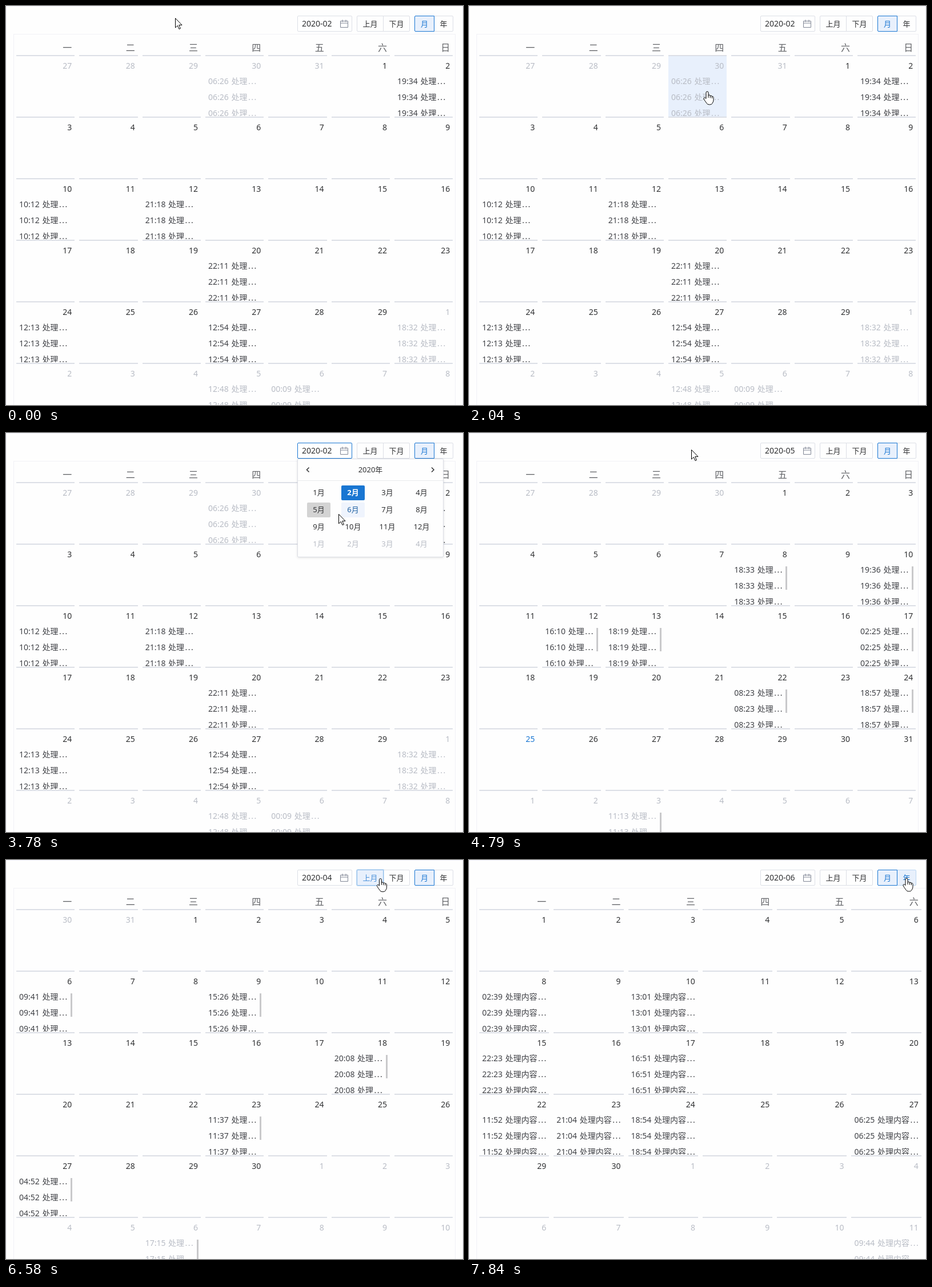
An HTML page that plays this animation: 800x700 px, repeating every 8 s.

```html
<!DOCTYPE html>
<html lang="zh-CN">
<head>
<meta charset="utf-8">
<title>日历</title>
<style>
html, body { margin: 0; width: 100%; height: 100%; overflow: hidden; background: #fff; }
body { font: 14px/28px "Noto Sans", "Noto Sans CJK SC", "Noto Sans CJK", sans-serif; color: #303133; }
#stage { --blue: #1976d2; --line: #dcdfe6; position: relative; width: 800px; height: 700px; overflow: hidden; background: #fefefe; }
#stage, #stage * { box-sizing: border-box; }
#stage > * { position: absolute; }
#edge { inset: 0; border: 1px solid #f4f4fc; border-bottom: 0; }
#card { left: 13px; top: 49px; width: 774px; height: 700px; border: 1px solid #f1f1f6; }
.wide #card { width: 900px; }

.hot {
  --h: 0;
  background: color-mix(in srgb, #e8f0fc calc(var(--h) * 100%), #fefefe);
  color: color-mix(in srgb, var(--blue) calc(var(--h) * 100%), #303133);
}
.box { top: 17px; height: 28px; line-height: 26px; font-size: 13px; text-align: center; border: 1px solid var(--line); }
.box.hot { border-color: color-mix(in srgb, #bad6f2 calc(var(--h) * 100%), var(--line)); }
.box.focus { border-color: #8fbdea; box-shadow: 0 0 0 1px #c9dff5; color: #4a91da; z-index: 1; }
#input { left: 510px; width: 96px; padding-left: 7px; font-size: 14px; text-align: left; border-radius: 2px; background: #fff; }
#input.on { border-color: var(--blue); }
#input svg { position: absolute; left: 74px; top: 6px; }
#prev { left: 614px; width: 47px; border-radius: 2px 0 0 2px; }
#next { left: 660px; width: 47px; border-radius: 0 2px 2px 0; }
#month { left: 715px; width: 35px; border-radius: 2px 0 0 2px; z-index: 1; background: #e8f0fc; color: var(--blue); border-color: var(--blue); }
#year { left: 749px; width: 34px; border-radius: 0 2px 2px 0; }

.grid { left: 18px; display: grid; grid-template-columns: repeat(7, var(--w)); column-gap: 8px; }
#week { top: 59px; text-align: right; font-size: 16px; color: #606266; }
#week span { padding-right: 5px; }
#days { top: 86px; grid-auto-rows: 108px; }
.day { position: relative; border-top: 2px solid var(--line); color: #303133; }
.day b { position: absolute; right: 5px; top: 3px; font-weight: 400; }
.day ul { position: absolute; left: 5px; top: 30px; height: 75px; margin: 0; padding: 0; overflow: hidden; list-style: none; white-space: nowrap; word-spacing: 1px; color: #404247; }
.day i { font-style: normal; letter-spacing: 1.5px; padding-left: 1.5px; }
.day s { position: absolute; left: calc(var(--w) - 7.3px); top: 38px; width: 3px; height: 41px; background: #c9c9cb; opacity: var(--bar); }
.muted b, .muted ul { color: #b8bcc5; font-weight: 500; }
.today b { color: var(--blue); }

#popup { left: 510px; top: 45px; width: 256px; height: 173px; background: #fefefe; border: 1px solid var(--line); border-radius: 2px; box-shadow: 0 1px 4px #0000001f; transform-origin: top; z-index: 2; font-size: 13px; text-align: center; }
#popup > * { position: absolute; }
#title { left: 0; right: 0; top: 0; height: 38px; line-height: 36px; border-bottom: 1px solid #e8eaec; }
#popup .m { width: 41px; height: 26px; line-height: 25px; border-radius: 2px; }
#popup .sel { background: var(--blue); color: #fff; font-weight: 700; }
#popup .now { background: #d3d3d3; color: #303133; }
#popup .off { color: #b8bcc5; }
svg { display: block; fill: none; overflow: visible; }
#cursor { left: 0; top: 0; z-index: 3; fill: #fff; stroke: #000; stroke-linejoin: round; }
</style>
</head>
<body>
<div id="stage">
  <div id="edge"></div>
  <div id="card"></div>
  <div id="input" class="box"><span id="value"></span>
    <svg width="14" height="14" stroke="#808695"><path d="M.5 2.5h13v11H.5zM.5 6h13M4 0v4M10 0v4"/></svg>
  </div>
  <div id="prev" class="box hot">上月</div>
  <div id="next" class="box hot">下月</div>
  <div id="month" class="box">月</div>
  <div id="year" class="box hot">年</div>
  <div id="week" class="grid"></div>
  <div id="days" class="grid"></div>
  <div id="popup">
    <div id="title">2020年</div>
    <svg style="left:15px;top:14px" width="6" height="9" stroke="#303133" stroke-width="1.5"><path d="M4.5 .5l-4 4 4 4"/></svg>
    <svg style="left:233px;top:14px" width="6" height="9" stroke="#303133" stroke-width="1.5"><path d="M1 .5l4 4-4 4"/></svg>
  </div>
  <svg id="cursor" width="1" height="1">
    <path id="arrow" d="M.5 .5V17L4.3 13.4 7 19.5 9.4 18.5 6.8 12.4H12Z"/>
    <g id="hand">
      <path d="M-2 12V2Q-2 0 0 0 2 0 2 2V7.5Q2 6 3.7 6.3 5.3 6.6 5.3 8 5.6 7 7 7.3 8.4 7.6 8.4 9 8.8 8.3 9.8 8.6 11 9 11 10.5V15Q11 18 9 20.5 8.5 23 3.5 23 0 23-1 20.5-4 16.5-6 13-6.4 11-4.8 10.7-3.5 10.5-2 12.5Z"/>
      <path fill="none" d="M2 7.5V11M5.3 8V11.5M8.4 9V12"/>
    </g>
  </svg>
</div>
<script>
const LOOP = 8000;
const DAY = 864e5;
const $ = id => document.getElementById(id);
const clamp = v => Math.max(0, Math.min(1, v));

// events: cell index -> time of day
const views = [
  { at: -LOOP, month: 2, first: '2020-01-27', events: { 3: '06:26', 6: '19:34', 14: '10:12', 16: '21:18', 24: '22:11', 28: '12:13', 31: '12:54', 34: '18:32', 38: '12:48', 39: '00:09' } },
  { at: 4440, month: 5, first: '2020-04-27', events: { 11: '18:33', 13: '19:36', 15: '16:10', 16: '18:19', 20: '02:25', 25: '08:23', 27: '18:57', 37: '11:13' } },
  { at: 6290, month: 4, first: '2020-03-30', events: { 7: '09:41', 10: '15:26', 19: '20:08', 24: '11:37', 28: '04:52', 37: '17:15' } },
  { at: 6900, month: 5, first: '2020-04-27', events: { 0: '23:34', 4: '13:23', 16: '14:43', 20: '19:20', 22: '17:35', 24: '03:47', 29: '07:47', 31: '16:07', 39: '03:49' } },
  { at: 7160, month: 6, first: '2020-06-01', wide: true, events: { 7: '02:39', 9: '13:01', 14: '22:23', 16: '16:51', 21: '11:52', 22: '21:04', 23: '18:54', 26: '06:25', 40: '09:44' } }
];

// pointer path: time, x, y
const path = [
  [0, 296, 21], [70, 296, 21], [780, 415, 155], [1960, 415, 155], [2040, 417, 150],
  [2560, 572, 30], [2710, 572, 30], [3480, 605, 138], [3700, 605, 138], [3780, 582, 142],
  [4100, 548, 138], [4440, 546, 138], [4790, 389, 29], [4960, 391, 190], [5190, 391, 190],
  [5970, 682, 30], [6060, 682, 30], [6260, 640, 31], [6400, 640, 31], [6800, 676, 35],
  [7200, 676, 35], [7680, 744, 36], [7770, 758, 34], [7840, 766, 32], [LOOP, 766, 32]
];
const popupOpen = 2710, popupClose = 4440;

const viewAt = t => views.findLast(v => t >= v.at);
const widthOf = v => v.wide ? 122.3 : 102.33;

function pointer(t) {
  const i = Math.max(1, path.findIndex(p => p[0] >= t));
  const [t0, x0, y0] = path[i - 1], [t1, x1, y1] = path[i];
  const k = clamp((t - t0) / (t1 - t0)), e = k * k * (3 - 2 * k);
  return [x0 + (x1 - x0) * e, y0 + (y1 - y0) * e];
}

// id of the clickable thing under the pointer
function hit(t) {
  const [x, y] = pointer(t);
  if (t > popupOpen && t < popupClose && x > 510 && x < 766 && y > 45 && y < 218) {
    const px = x - 527, py = y - 92;
    if (px < 0 || py < 0 || px % 60 > 41 || py % 30 > 26) return '';
    return 'm' + (Math.floor(py / 30) * 4 + Math.floor(px / 60));
  }
  if (y >= 17 && y < 45) {
    const bars = [['input', 510, 606], ['prev', 614, 660], ['next', 660, 707], ['month', 715, 750], ['year', 750, 783]];
    return (bars.find(b => x >= b[1] && x < b[2]) || [''])[0];
  }
  if (y < 86 || x < 18) return '';
  const w = widthOf(viewAt(t)), dx = x - 18, col = Math.floor(dx / (w + 8));
  return dx % (w + 8) > w ? '' : 'c' + (Math.floor((y - 86) / 108) * 7 + col);
}

function dayCell(v, i) {
  const d = new Date(Date.parse(v.first) + i * DAY);
  const m = d.getUTCMonth() + 1, n = d.getUTCDate(), time = v.events[i];
  const cls = m !== v.month ? 'muted' : m === 5 && n === 25 ? 'today' : '';
  const row = `<li>${time} 处理${v.wide ? '内容' : ''}<i>...</i></li>`;
  const list = time ? `<ul>${row.repeat(3)}</ul><s></s>` : '';
  return `<div id="c${i}" class="day hot ${cls}"><b>${n}</b>${list}</div>`;
}

function showView(v) {
  $('stage').style.setProperty('--w', widthOf(v) + 'px');
  $('stage').classList.toggle('wide', !!v.wide);
  $('value').textContent = '2020-0' + v.month;
  $('days').innerHTML = Array.from({ length: 42 }, (_, i) => dayCell(v, i)).join('');
}

$('week').innerHTML = [...'一二三四五六日'].map(c => `<span>${c}</span>`).join('');
for (let i = 0; i < 16; i++) {
  const cls = i === 1 ? 'sel' : i === 4 ? 'now' : i > 11 ? 'hot off' : 'hot';
  const pos = `left:${16 + i % 4 * 60}px;top:${46 + Math.floor(i / 4) * 30}px`;
  $('popup').insertAdjacentHTML('beforeend', `<div id="m${i}" class="m ${cls}" style="${pos}">${i % 12 + 1}月</div>`);
}

let shown, lit = [];

function render(t) {
  const v = viewAt(t);
  if (v !== shown) showView(shown = v);
  $('stage').style.setProperty('--bar', clamp((520 - (t - v.at)) / 140));

  // hover strength: share of the last 100 ms spent over each item
  const heat = {};
  for (let k = 0; k < 10; k++) {
    const id = hit(Math.max(0, t - k * 10));
    if (id) heat[id] = (heat[id] || 0) + .1;
  }
  lit.forEach(id => $(id).style.removeProperty('--h'));
  lit = Object.keys(heat).filter($);
  lit.forEach(id => $(id).style.setProperty('--h', clamp(heat[id])));

  const over = hit(t);
  const open = clamp((t - popupOpen) / 240) * clamp((popupClose + 180 - t) / 180);
  const pop = $('popup').style;
  pop.opacity = open;
  pop.transform = `scaleY(${.8 + .2 * open})`;
  pop.visibility = open ? 'visible' : 'hidden';
  $('input').classList.toggle('on', over === 'input' || t >= popupOpen && t < popupClose);
  $('prev').classList.toggle('focus', t >= 6290 && t < 6900);
  $('next').classList.toggle('focus', t >= 6900 && t < 7450);

  const [x, y] = pointer(t);
  $('cursor').style.transform = `translate(${x}px, ${y}px)`;
  $('hand').style.display = over ? '' : 'none';
  $('arrow').style.display = over ? 'none' : '';
}

const start = performance.now();
function tick() {
  render((performance.now() - start) % LOOP);
  requestAnimationFrame(tick);
}
tick();
</script>
</body>
</html>
```
